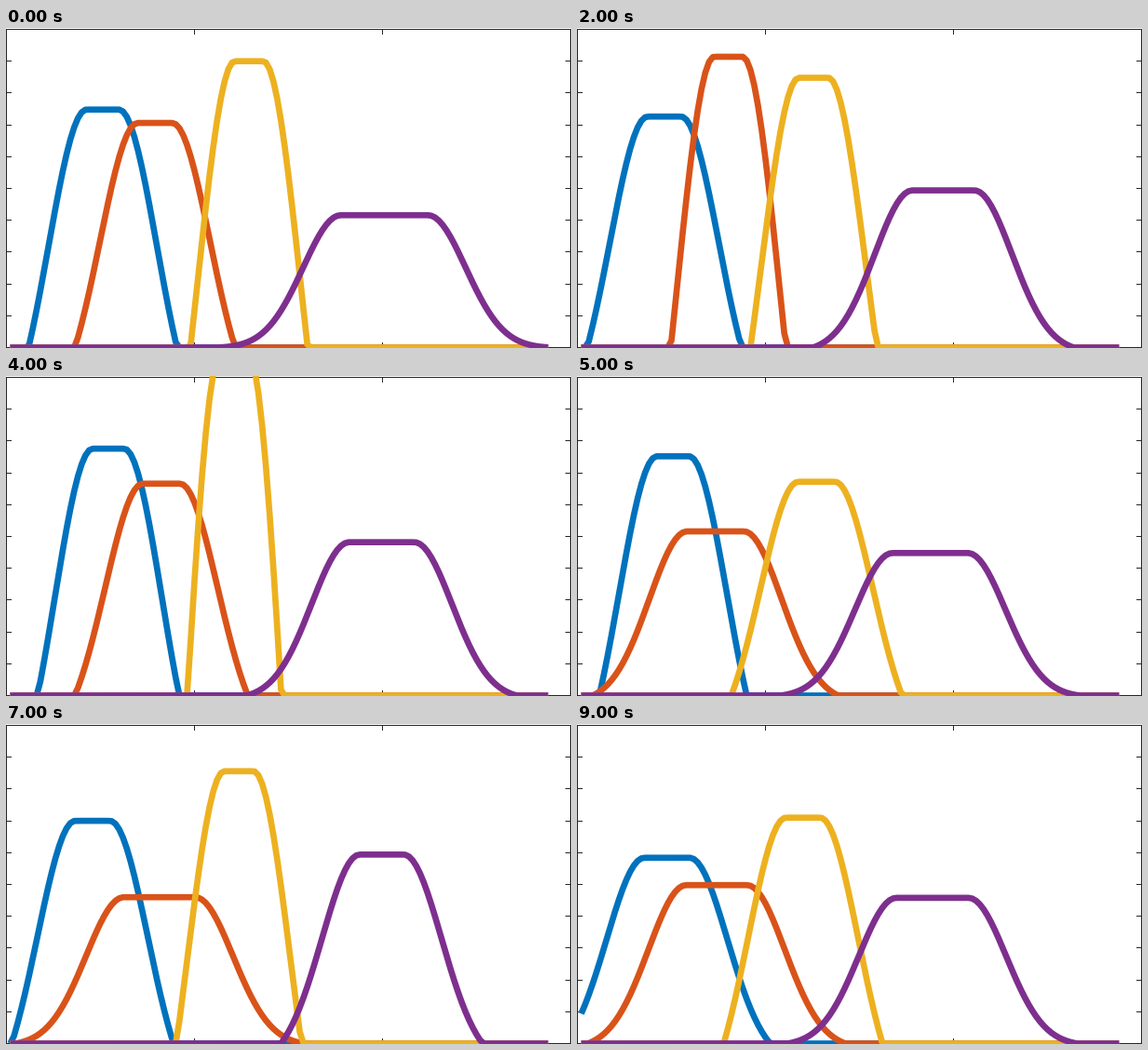
A matplotlib script for the animation above (10000 ms loop, 607 px wide and 344 px high).

```python
import numpy as np
import matplotlib.pyplot as plt
from matplotlib.animation import FuncAnimation

W, H, DPI = 607, 344, 100
PX = 72 / DPI
LEFT, RIGHT, TOP, BOTTOM = 0.5, 606.5, 1.5, 343.5
X_MAX, Y_MAX, SIGMA, STEPS = 150, 0.05, 10, 10
COLORS = ["#0072BD", "#D95319", "#EDB120", "#7E2F8E"]

# Key poses by second; steps without one lie between their neighbours
KEY_TIMES = [0, 1, 2, 4, 5, 7, 9]
CENTERS = [
    [25.6, 24.1, 23.1, 27.1, 25.4, 22.9, 23.8],
    [39.5, 37.1, 40.1, 41.2, 36.7, 40.7, 37],
    [64.5, 64.5, 62.8, 60.6, 63.6, 61.8, 60],
    [100.5, 98, 97.3, 99.8, 93.8, 99.8, 94.4],
]
PEAKS = [  # thousandths
    [37.4, 38.8, 36.3, 38.8, 37.6, 35, 29.2],
    [35.3, 34, 45.7, 33.3, 25.8, 23, 24.9],
    [45, 30.5, 42.4, 53.8, 33.6, 42.8, 35.5],
    [20.8, 31, 24.7, 24.1, 22.4, 29.7, 22.9],
]

x = np.arange(1, 145)


def to_px(i):
    return LEFT + (RIGHT - LEFT) * i / X_MAX


def to_py(v):
    return BOTTOM - (BOTTOM - TOP) * v / Y_MAX


def flank(dist, reach):
    """Gaussian falling from 1 to 0 at the given reach."""
    floor = np.exp(-(reach / SIGMA) ** 2 / 2)
    bell = np.exp(-(dist / SIGMA) ** 2 / 2)
    return np.maximum(0, (bell - floor) / (1 - floor))


def curve(center, peak):
    """Unit-area plateau with two flanks; broader curves have longer flanks."""
    spread = 1 / peak
    reach = 0.8 * spread - 6
    side = flank(np.linspace(0, reach, 200), reach).mean() * reach
    half = spread / 2 - side
    dist = np.maximum(0, np.abs(x - center) - half)
    return peak * flank(dist, reach)


fig = plt.figure(figsize=(W / DPI, H / DPI), dpi=DPI, facecolor="white")
ax = fig.add_axes([0, 0, 1, 1])
ax.set_xlim(0, W)
ax.set_ylim(H, 0)
ax.axis("off")


def rule(xs, ys):
    ax.plot(xs, ys, color="#262626", lw=PX, solid_capstyle="projecting",
            snap=False, zorder=1)


for y in (TOP, BOTTOM):
    rule([LEFT, RIGHT], [y, y])
for side in (LEFT, RIGHT):
    rule([side, side], [TOP, BOTTOM])
for i in (50, 100):
    px = to_px(i)
    rule([px, px], [TOP, TOP + 5])
    rule([px, px], [BOTTOM - 5, BOTTOM])
for k in range(1, 10):
    py = np.floor(to_py(Y_MAX * k / 10)) + 0.5
    rule([LEFT, LEFT + 5], [py, py])
    rule([RIGHT - 5, RIGHT], [py, py])

lines = [
    ax.plot([], [], color=c, lw=6.67 * PX, solid_capstyle="butt",
            solid_joinstyle="round", zorder=2 + n)[0]
    for n, c in enumerate(COLORS)
]


def draw(step):
    for line, centers, peaks in zip(lines, CENTERS, PEAKS):
        center = np.interp(step, KEY_TIMES, centers)
        peak = np.interp(step, KEY_TIMES, peaks) / 1000
        line.set_data(to_px(x), to_py(curve(center, peak)))
    return lines


anim = FuncAnimation(fig, draw, frames=STEPS, interval=1000,
                     repeat=True, repeat_delay=0)
plt.show()
```
